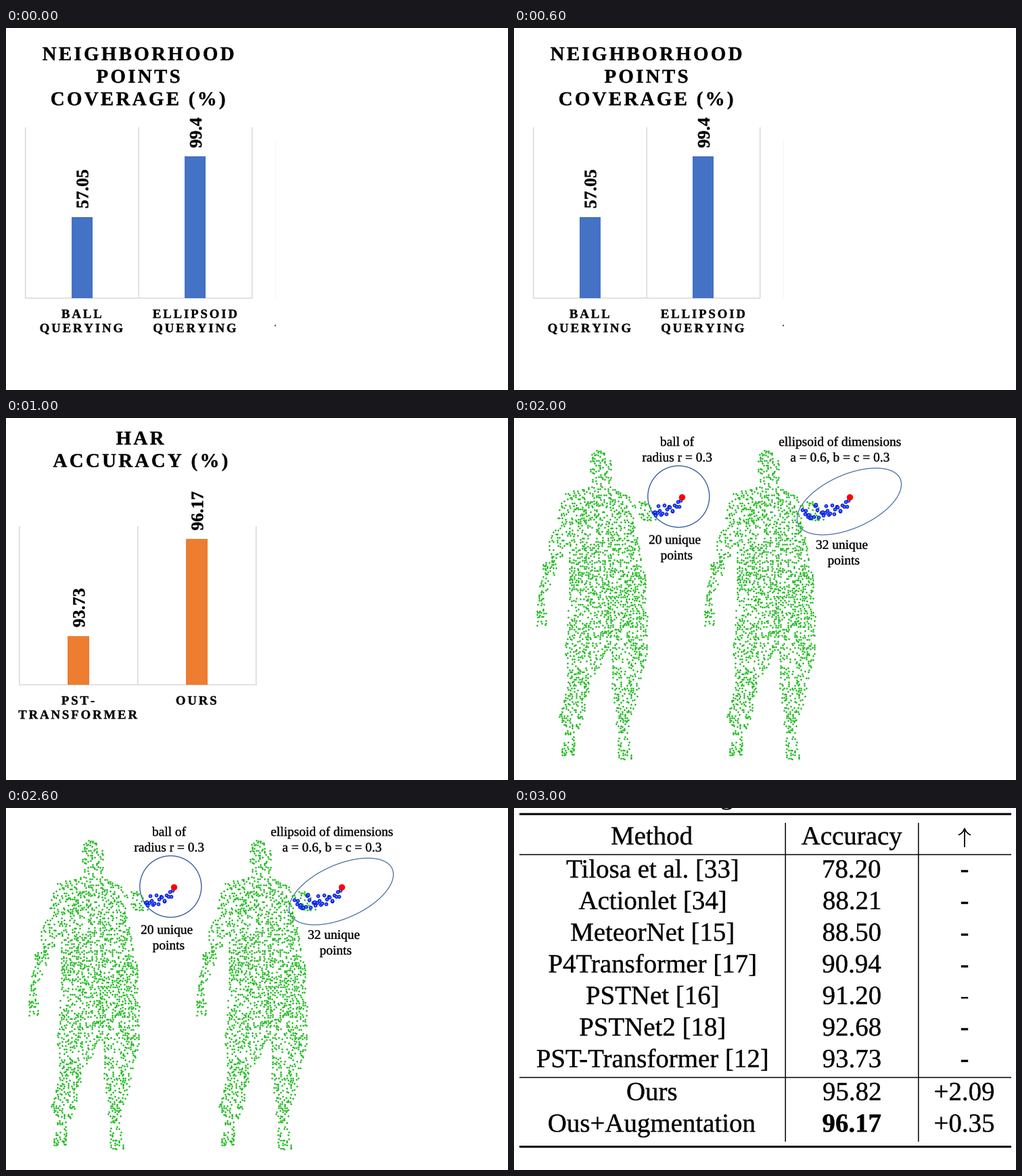
A matplotlib script that plays this animation: 742 by 536 pixels, repeating every 4 s.

```python
import matplotlib.pyplot as plt
import numpy as np
from matplotlib.animation import FuncAnimation
from matplotlib.patches import Ellipse, PathPatch, Rectangle
from matplotlib.path import Path
from matplotlib.textpath import TextPath
from matplotlib.transforms import Affine2D

W, H, DPI = 742, 536, 100
PX = 72 / DPI  # points per pixel
GRID = "#d9d9d9"

fig = plt.figure(figsize=(W / DPI, H / DPI), dpi=DPI, facecolor="white")


def new_slide():
    ax = fig.add_axes([0, 0, 1, 1])
    ax.set(xlim=(0, W), ylim=(H, 0))
    ax.axis("off")
    return ax


def glyphs(s, size, weight):
    prop = {"family": "Liberation Serif", "weight": weight}
    return TextPath((0, 0), s, size=size, prop=prop)


def tracked(s, size, weight, spacing):
    """Outline of a string with extra space between its letters."""
    def width(t):
        return glyphs(t, size, weight).get_extents().width

    parts, x = [], 0
    for c in s:
        if c != " ":
            outline = glyphs(c, size, weight)
            parts.append(Path(outline.vertices + [x, 0], outline.codes))
        x += width(f"|{c}|") - width("||") + spacing
    return Path.make_compound_path(*parts)


def text(ax, x, y, s, size, weight="normal", spacing=0, upward=False):
    """Text centred on x with its baseline on y, or rising from (x, y)."""
    path = tracked(s, size, weight, spacing) if spacing else glyphs(s, size, weight)
    box = path.get_extents()
    origin = box.x0 if upward else (box.x0 + box.x1) / 2
    place = Affine2D().translate(-origin, 0).scale(1, -1)
    if upward:
        place.rotate_deg(-90)
    place.translate(x, y)
    ax.add_patch(PathPatch(place.transform_path(path), color="black", lw=0.4 * PX))


def line(ax, xs, ys, color="black", width=1.5):
    ax.plot(xs, ys, color=color, lw=width * PX, solid_capstyle="butt", snap=False)


def bar_chart(ax, title, title_at, left, cell, top, base, limits, color, bars):
    title_x, title_y = title_at
    for i, row in enumerate(title):
        text(ax, title_x, title_y + 33.3 * i, row, 29, "bold", 3.25)

    right = left + cell * len(bars)
    for x in np.arange(left, right + 1, cell):
        line(ax, [x, x], [top, base], GRID)
    line(ax, [left - 0.7, right + 0.7], [base, base], GRID)

    low, high = limits
    for i, (label, value) in enumerate(bars):
        x = left + cell * (i + 0.5)
        height = (base - top) * (value - low) / (high - low)
        width = 0.185 * cell
        ax.add_patch(Rectangle((x - width / 2, base - height), width, height,
                               fc=color, lw=0, zorder=3))
        text(ax, x + 9, base - height - 13.5, str(value), 25.8, "bold", upward=True)
        for j, row in enumerate(label.split()):
            text(ax, x - 0.9, base + 29.3 + 21 * j, row, 18.8, "bold", 2.85)


def coverage_slide(ax):
    bar_chart(ax, ["NEIGHBORHOOD", "POINTS", "COVERAGE (%)"], (195.2, 47.7),
              28.7, 167.5, 147, 400, (0, 120), "#4472c4",
              [("BALL QUERYING", 57.05), ("ELLIPSOID QUERYING", 99.4)])
    line(ax, [398.5, 398.5], [167, 400], "#f3f3f3", 1)
    line(ax, [397.2, 398.8], [441.5, 439.5], "#333333")


def accuracy_slide(ax):
    bar_chart(ax, ["HAR", "ACCURACY (%)"], (198.4, 39.2),
              19.7, 175, 160, 395, (92.5, 96.5), "#ed7d31",
              [("PST- TRANSFORMER", 93.73), ("OURS", 96.17)])


# Each body part: (y, left, right) at a few heights, straight in between.
PARTS = [
    [(48, 117, 130), (62, 110, 148), (101, 113, 141), (110, 74, 168),
     (240, 82, 195), (345, 75, 197)],
    [(112, 74, 100), (205, 45, 70), (265, 34, 44), (306, 31, 48)],
    [(122, 168, 196), (150, 188, 214)],
    [(345, 75, 137), (400, 78, 110), (440, 66, 103), (470, 75, 90), (498, 67, 90)],
    [(345, 144, 197), (400, 145, 184), (465, 152, 168), (504, 152, 173)],
]


def body_cloud(rng):
    """Randomly filled cells of a fine lattice, kept where a body part covers them."""
    x, y = (a.ravel() for a in np.meshgrid(np.arange(28, 218, 3), np.arange(48, 506, 3)))
    inside = np.zeros(x.shape, bool)
    for part in PARTS:
        ys, lefts, rights = np.transpose(part)
        inside |= ((y >= ys[0]) & (y <= ys[-1])
                   & (x >= np.interp(y, ys, lefts)) & (x <= np.interp(y, ys, rights)))
    kept = inside & (rng.random(x.size) < 0.42)
    cloud = np.column_stack([x, y])[kept]
    return cloud + rng.integers(0, 2, cloud.shape)


def arm_points(rng, count=32):
    """Points scattered along the raised forearm, tighter towards the hand."""
    t = (np.arange(count) + rng.random(count)) / count
    y = 139 - 13 * t ** 3 + rng.uniform(-1, 1, count) * (13 - 8 * t)
    return np.column_stack([178 + 69 * t, y])


def dots(ax, points, diameter, **style):
    ax.scatter(*np.transpose(points), s=(diameter * PX) ** 2, **style)


def paragraph(ax, x, y, rows, drift=0):
    for i, row in enumerate(rows):
        text(ax, x + drift * i, y + 23.1 * i, row, 19.4)


def cloud_slide(ax):
    rng = np.random.default_rng(7)
    cloud, arm = body_cloud(rng), arm_points(rng)
    ball = Ellipse((243.3, 116.3), 91, 91, fill=False, ec="#2f5597", lw=1.3 * PX)
    ellipsoid = Ellipse((495.5, 123.6), 165, 79.4, angle=-24, fill=False,
                        ec="#41699c", lw=1.2 * PX)
    for shift, region in ((0, ball), (248, ellipsoid)):
        ax.add_patch(region)
        outline = region.get_patch_transform().transform_path(region.get_path())
        shifted = arm + [shift, 0]
        dots(ax, cloud + [shift, 0], 2.6, c="#12b612", lw=0)
        dots(ax, shifted[outline.contains_points(shifted)], 4.3, c="#4080f0",
             ec="#0a14e6", lw=1.3 * PX, zorder=3)
        dots(ax, [(248 + shift, 117.3)], 9.4, c="#ff0000", lw=0, zorder=4)

    paragraph(ax, 241, 41.3, ["ball of", "radius r = 0.3"])
    paragraph(ax, 481.8, 41.3, ["ellipsoid of dimensions", "a = 0.6, b = c = 0.3"])
    paragraph(ax, 237.7, 186.3, ["20 unique", "points"], 2.4)
    paragraph(ax, 484.7, 193.8, ["32 unique", "points"], 2.4)


ROWS = [("Tilosa et al. [33]", "78.20", "-"), ("Actionlet [34]", "88.21", "-"),
        ("MeteorNet [15]", "88.50", "-"), ("P4Transformer [17]", "90.94", "-"),
        ("PSTNet [16]", "91.20", "-"), ("PSTNet2 [18]", "92.68", "-"),
        ("PST-Transformer [12]", "93.73", "-"), ("Ours", "95.82", "+2.09"),
        ("Ous+Augmentation", "96.17", "+0.35")]


def table_slide(ax):
    size, columns = 38.9, (203.9, 499.3, 665.7)
    text(ax, 315, -5.8, "g", size)  # tail of the caption above
    for y, width in ((9, 3), (69, 1.5), (399, 1.5), (501.5, 3)):
        line(ax, [8, 735], [y, y], width=width)
    for x in (401.2, 597.8):
        line(ax, [x, x], [22, 494])

    for x, s in zip(columns, ("Method", "Accuracy")):
        text(ax, x, 54, s, size)
    line(ax, [666, 666], [30, 58], width=1.8)
    head = Path([(657, 40), (664, 37), (666, 30), (668, 37), (675, 40)],
                [Path.MOVETO] + [Path.CURVE3] * 4)
    ax.add_patch(PathPatch(head, fill=False, lw=1.8 * PX))

    for i, row in enumerate(ROWS):
        y = 103 + 46.8 * i + (2 if i > 6 else 0)  # extra room below the rule
        for x, s in zip(columns, row):
            text(ax, x, y, s, size, "bold" if s == "96.17" else "normal")


slides = []
for build in (coverage_slide, accuracy_slide, cloud_slide, table_slide):
    slides.append(new_slide())
    build(slides[-1])


def show(frame):
    for i, ax in enumerate(slides):
        ax.set_visible(i == frame)
    return slides


animation = FuncAnimation(fig, show, frames=len(slides), interval=1000,
                          repeat=True, repeat_delay=0, blit=False)
plt.show()
```
